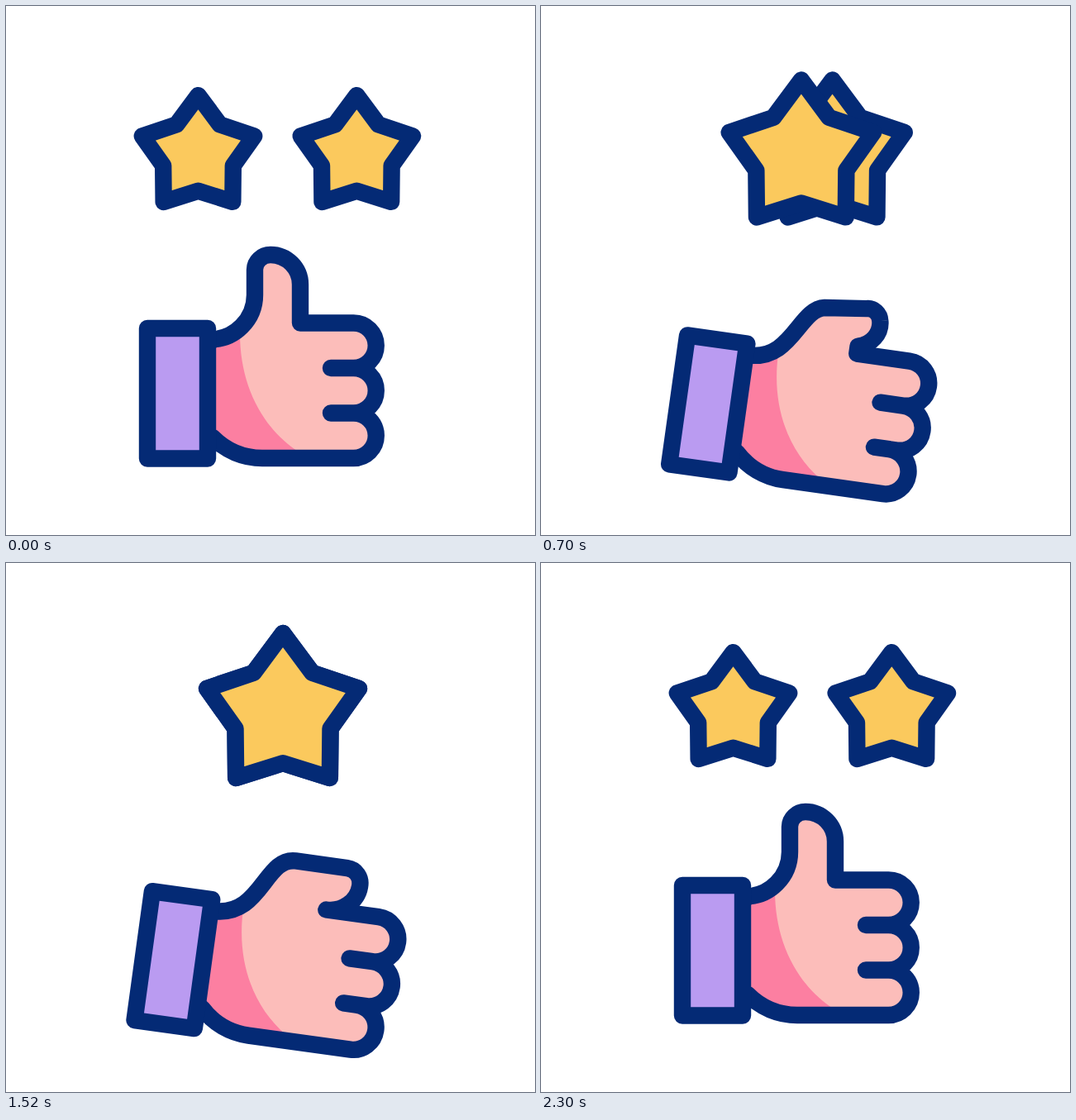
An HTML page that plays this animation: 640 px wide and 640 px high, repeating every 2.4 s.

```html
<!DOCTYPE html>
<html lang="en">
<head>
<meta charset="utf-8">
<title>Thumbs up and stars</title>
<style>
html, body { margin: 0; height: 100%; overflow: hidden; background: #fff; }
svg { display: block; width: 100%; height: 100%; }
.line { stroke: #042a75; stroke-width: 20.4; stroke-linejoin: round; stroke-linecap: round; }
</style>
</head>
<body>
<svg viewBox="0 0 640 640">
  <g class="line" fill="#fbc95d">
    <path id="right"/>
    <path id="left"/>
  </g>
  <g id="hand">
    <path id="skin" fill="#fcbdba"/>
    <path fill="#fc7fa1" d="M247 403.5L283 396C283 460 311 512 355 540V547H310A85 85 0 0 1 250 522Z"/>
    <path id="outline" class="line" fill="none"/>
    <rect class="line" fill="#ba9bf1" x="171" y="390" width="73" height="157.5"/>
  </g>
</svg>
<script>
const LOOP = 2400, START = 200, SPLIT = 1840, END = 2300, BEAT = 400;
const $ = id => document.getElementById(id);
const mix = (a, b, p) => a + (b - a) * p;

// Eased rise from 0 to 1 between two times.
function ramp(t, from, to) {
  const s = Math.min(1, Math.max(0, (t - from) / (to - from)));
  return s * s * (3 - 2 * s);
}

const merged = t => ramp(t, START, 900) - ramp(t, SPLIT, END);

const dip = (t, from) => ramp(t, from, from + BEAT) - ramp(t, from + BEAT, from + 2 * BEAT);
const drop = t => 31.5 * (dip(t, START) + dip(t, START + 2 * BEAT)) + 1.3 * merged(t);

const tilt = t => 8 * (ramp(t, START, 700) + ramp(t, SPLIT, END)
  - 2 * (ramp(t, 700, 1100) - ramp(t, 1100, 1500) + ramp(t, 1500, SPLIT)));

function star(cx, cy, radius) {
  const points = Array.from({ length: 10 }, (_, i) => {
    const r = i % 2 ? radius * 0.625 : radius, a = i * Math.PI / 5;
    return [cx + r * Math.sin(a), cy - r * Math.cos(a)];
  });
  return `M${points.join("L")}Z`;
}

// A curve that rounds off the given corner.
function bend(from, corner, to) {
  const handle = end => end.map((v, i) => mix(v, corner[i], 0.55));
  return `C${handle(from)} ${handle(to)} ${to}`;
}

// Hand outline; p goes from raised thumb (0) to closed fist (1).
function handPath(p) {
  const at = (x0, y0, x1, y1) => [mix(x0, x1, p), mix(y0, y1, p)];
  const root = at(301, 349.5, 338, 330);
  const knuckle = at(301, 319, 401, 330);
  const top = at(320, 301, 419, 350);
  const side = at(356, 337, 382.5, 383.5);
  const heel = at(356, 383.5, 382.5, 383.5);

  const thumb = `M247 403.5C${at(277, 403.5, 306, 403.5)} ${at(301, 379, 300, 330)} ${root}L${knuckle}`
    + bend(knuckle, at(301, 301, 420, 330), top)
    + bend(top, at(356, 301, 418, 383.5), side) + `L${heel}`;

  const gap = mix(393, 418.5, p);
  let fingers = "";
  for (let i = 0; i < 3; i++) {
    const x = mix(420.5, i < 2 ? 446.5 : 434.5, p), y = 383.5 + 54.5 * (i + 1);
    fingers += `H${x}A27.25 27.25 0 0 1 ${x} ${y}H${i < 2 ? gap : 310}`;
  }
  return thumb + fingers + "A85 85 0 0 1 250 522";
}

function draw(t) {
  const p = merged(t), y = mix(179.3, 181.7, p), r = mix(71.2, 96.7, p);
  $("left").setAttribute("d", star(mix(232.5, 335, p), y, r));
  $("right").setAttribute("d", star(mix(424.3, 335, p), y, r));
  const d = handPath(p);
  $("skin").setAttribute("d", d);
  $("outline").setAttribute("d", d);
  $("hand").setAttribute("transform", `translate(0 ${drop(t)}) rotate(${tilt(t)} 311 424)`);
}

const start = performance.now();
function tick() {
  draw((performance.now() - start) % LOOP);
  requestAnimationFrame(tick);
}
tick();
</script>
</body>
</html>
```
